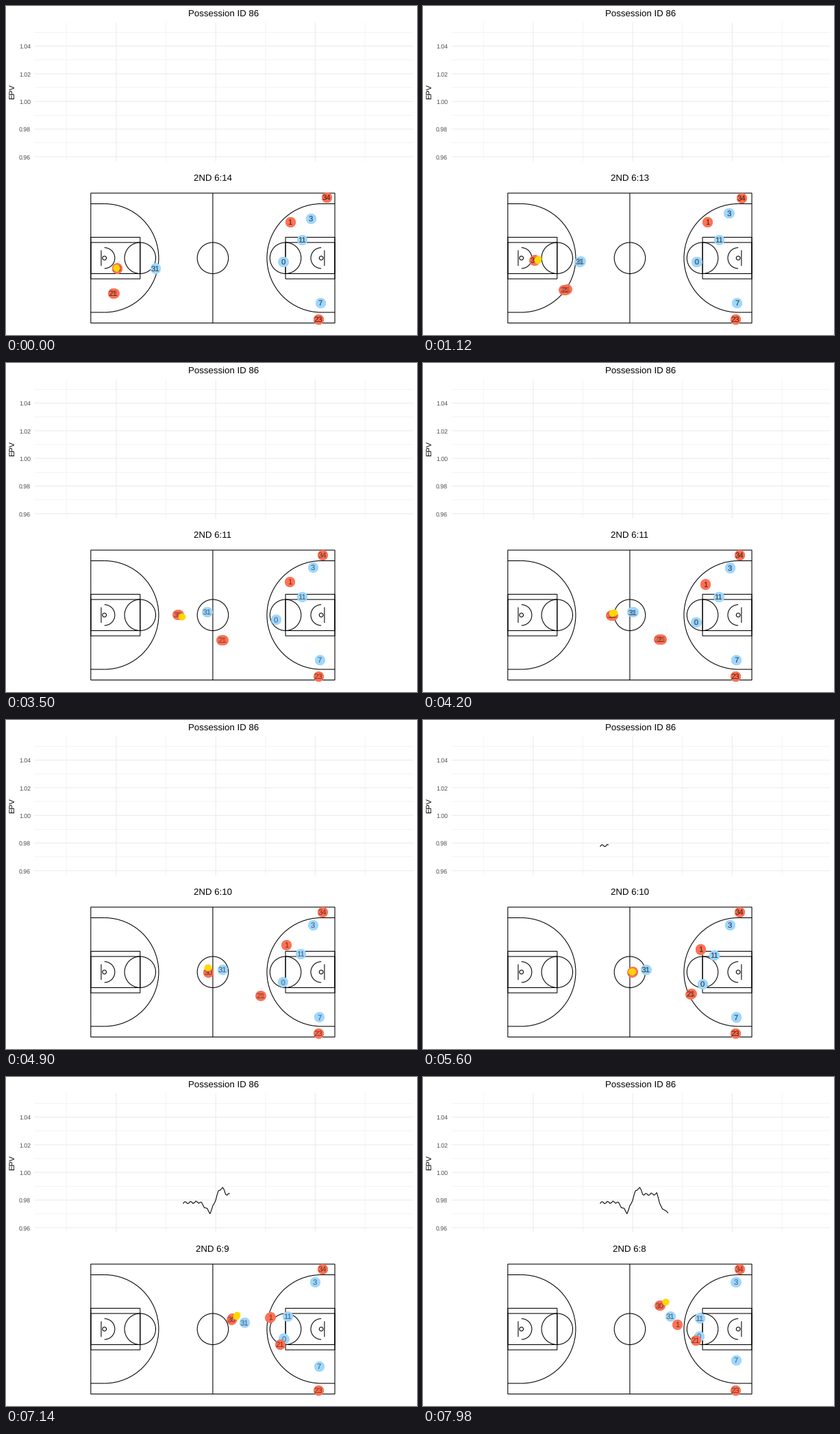
Animation, 600 px wide and 480 px high, one loop 8 s. Source, as a matplotlib script:

```python
import numpy as np
import matplotlib.pyplot as plt
from matplotlib.animation import FuncAnimation
from matplotlib.patches import Arc, Circle, Rectangle

plt.rcParams["font.family"] = "Liberation Sans"
plt.rcParams["path.snap"] = False
plt.rcParams["text.hinting"] = "none"

PX = 0.72             # points per pixel at 100 dpi
TICK, STEP = 40, 140  # ms per drawn frame, ms per data step
LOOP = 8000
THIN = 1.07 * PX

fig = plt.figure(figsize=(6, 4.8), dpi=100, facecolor="white")
ax = fig.add_axes([0, 0, 1, 1])
ax.set_xlim(-0.5, 599.5)
ax.set_ylim(479.5, -0.5)
ax.axis("off")


def label(x, y, s, size, **kw):
    kw = {"ha": "center", "va": "baseline", **kw}
    return ax.text(x, y, s, fontsize=size * PX, **kw)


def seg(xs, ys, lw=THIN, color="black", **kw):
    return ax.plot(xs, ys, lw=lw, color=color, solid_capstyle="butt", **kw)[0]


# ---- value chart ----
LEFT, RIGHT, TOP, BOTTOM = 41, 594, 23, 226


def grid_lines(xs, ys, lw):
    for x in xs:
        seg([x, x], [TOP, BOTTOM], lw, "#EBEBEB", zorder=0)
    for y in ys:
        seg([LEFT, RIGHT], [y, y], lw, "#EBEBEB", zorder=0)


major_y = 58 + 40.35 * np.arange(5)
grid_lines(88 + 145.2 * np.arange(4), major_y - 20.2, 0.55 * PX)
grid_lines(160.5 + 145.2 * np.arange(3), major_y, THIN)

for i, y in enumerate(major_y):
    label(35.5, y + 3.6, f"{1.04 - 0.02 * i:.2f}", 8.8, ha="right", color="#4D4D4D")
label(14, 124.5, "EPV", 11, rotation=90, ha="right", va="center")
label(317.5, 14.6, "Possession ID 86", 13.2)
clock = label(301, 254.8, "", 13.2)
trace = seg([], [], solid_joinstyle="round", zorder=2)


def epv(x):
    trend = np.interp(x, [258, 283, 298, 310, 315, 321, 341, 349, 353, 358],
                      [183, 182, 198, 166, 160, 171, 170, 194, 192, 201])
    return trend - 1.8 * np.cos(2 * np.pi * (x - 333) / 8)


# ---- court, measured in feet ----
FT = 3.79
X0, Y0 = 123.3, 272.5
W, H = 94 * FT, 50 * FT
CX, CY = X0 + W / 2, Y0 + H / 2


def add(patch):
    patch.set(fill=False, lw=THIN, edgecolor="black", zorder=1)
    ax.add_patch(patch)


def half_circle(x, r, side):
    a = 90 * side
    add(Arc((x, CY), 2 * r, 2 * r, theta1=-a, theta2=a))


def half_court(side):
    def at(feet):
        return CX + side * (feet * FT - W / 2)

    hoop, line, board = at(5.25), at(19), at(4)
    for half in (8 * FT, 6 * FT):
        add(Rectangle((min(at(0), line), CY - half), 19 * FT, 2 * half))
    add(Circle((line, CY), 6 * FT))
    add(Circle((hoop, CY), 0.75 * FT))
    half_circle(hoop, 4 * FT, side)
    half_circle(hoop, 20.9 * FT, side)
    for dy in (-20.9 * FT, 20.9 * FT):
        seg([at(0), hoop], [CY + dy, CY + dy], zorder=1)
    seg([board, board], [CY - 3 * FT, CY + 3 * FT], zorder=1)


add(Rectangle((X0, Y0), W, H))
seg([CX, CX], [Y0, Y0 + H], zorder=1)
add(Circle((CX, CY), 6 * FT))
half_court(1)
half_court(-1)


# ---- movement: monotone curves through (step, x, y) points ----
def path(*points):
    pts = np.array(points, float)
    ts, ps = pts[:, 0], pts[:, 1:]
    if len(ts) == 1:
        return lambda t: ps[0]
    d = np.diff(ps, axis=0) / np.diff(ts)[:, None]
    prod = np.maximum(d[:-1] * d[1:], 0)
    mid = 2 * prod / np.where(prod > 0, d[:-1] + d[1:], 1)
    vs = np.vstack([d[:1], mid, d[-1:]])

    def at(t):
        t = np.clip(t, ts[0], ts[-1])
        i = int(np.clip(np.searchsorted(ts, t) - 1, 0, len(ts) - 2))
        h = ts[i + 1] - ts[i]
        u = (t - ts[i]) / h
        s = u * u * (3 - 2 * u)
        return (ps[i] * (1 - s) + ps[i + 1] * s
                + u * (1 - u) * h * ((1 - u) * vs[i] - u * vs[i + 1]))

    return at


BLUES = {
    "3": path((0, 444, 309.5), (15, 447, 297.5), (45, 447, 298.5), (57, 456, 298.5)),
    "11": path((0, 431.5, 340), (30, 431, 340), (57, 403, 351)),
    "0": path((0, 404, 372.5), (22, 392.5, 373), (42, 408, 385), (57, 402, 377)),
    "7": path((0, 458.3, 432), (40, 456.5, 433), (57, 456, 412.5)),
    "31": path((0, 217, 382.3), (8, 228.5, 372), (17, 259.5, 361.5), (25, 293, 362.5),
               (45, 334.5, 363.5), (57, 360.5, 348)),
}
guard = path((0, 161, 382), (8, 162, 370), (17, 203.5, 363), (25, 250.5, 366.5),
             (35, 294.5, 367.5), (45, 314.5, 365.5), (57, 345, 332.5))
REDS = {
    "34": path((0, 467.8, 278.3), (14, 461.5, 279.7)),
    "1": path((0, 414.2, 314), (20, 414.5, 316), (42, 403, 336), (57, 370.3, 360.5)),
    "23": path((0, 455.6, 456.4)),
    "30": guard,
    "21": path((0, 155.3, 418.3), (25, 315, 403.5), (35, 371.3, 401.5),
               (45, 400.3, 395), (57, 397.3, 383.5)),
}


def dribble(t):
    swing = 4 + 5 * np.cos(2 * np.pi * (t - 17) / 40)
    bounce = -2 + 5 * np.cos(2 * np.pi * (t - 24) / 20)
    return guard(t) + (swing, bounce)


def discs(radius, color, z):
    return ax.scatter([], [], s=(2 * radius * PX) ** 2, color=color, lw=0, zorder=z)


class Team:
    def __init__(self, paths, color, z):
        self.paths = list(paths.values())
        self.dots = discs(7.5, color, z)
        self.tags = [[label(0, 0, n, 11.4, alpha=0.33, zorder=z + 1) for _ in range(3)]
                     for n in paths]

    def move(self, times):
        pos = [[p(t) for t in times] for p in self.paths]
        self.dots.set_offsets(np.reshape(pos, (-1, 2)))
        for tags, spots in zip(self.tags, pos):
            tags[2].set_visible(len(spots) == 3)
            for tag, spot in zip(tags, spots):
                tag.set_position(spot + (0, 4.1))


teams = [Team(BLUES, "#9FD7FF", 3), Team(REDS, "#FF7256", 5)]
ball = discs(4.9, "#FFD700", 7)


def draw(n):
    k = (n * TICK + TICK // 2) // STEP
    # each step overlays two or three samples of the tracking data
    count = 2 if k % 2 else 3
    times = k + 0.35 * (np.arange(count) - (count - 1) / 2)
    for team in teams:
        team.move(times)
    ball.set_offsets([dribble(t) for t in times])

    clock.set_text(f"2ND 6:{14 - (k + 6) // 10}")

    xs = np.arange(258, 296 + 5.17 * (k - 45) + 0.5, 2.07)
    trace.set_data(xs, epv(xs))
    return []


anim = FuncAnimation(fig, draw, frames=LOOP // TICK, interval=TICK,
                     init_func=lambda: draw(0), repeat=True, repeat_delay=0, blit=False)
plt.show()
```
